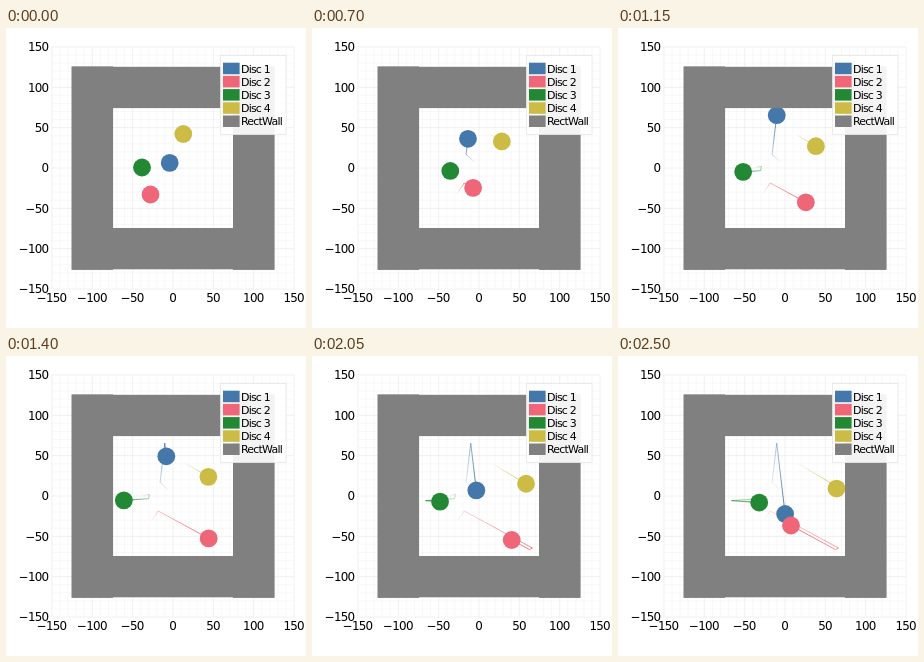
Recreate the animation shown at these times as an HTML page. Size 300 by 300 pixels, loop 2.55 s.

```html
<!DOCTYPE html>
<html lang="en">
<head>
<meta charset="utf-8">
<title>Bouncing discs</title>
<style>
html, body { margin: 0; width: 100%; height: 100%; overflow: hidden; background: #fff; }
svg { display: block; width: 100vw; height: 100vh; }
text { font-family: "DejaVu Sans", sans-serif; fill: #000; }
.tick { font-size: 11.9px; letter-spacing: -0.75px; }
.key { font-size: 11px; letter-spacing: -0.8px; }
</style>
</head>
<body>
<svg id="stage" viewBox="0 0 300 300"></svg>
<script>
const STEP = 50, STEPS = 51;
const CX = 167, CY = 140, UNIT = 0.807;
const RADIUS = 8.9, REACH = 52.6, WALL = '#808080';

// Start, velocity per step, and the new velocity at each collision
const discs = [
  { color: '#4477aa', at: [163.7, 134.9], v: [-1.2, -1.05], hits: { 8: [0.31, -2.62] } },
  { color: '#ee6677', at: [144.5, 166.5], v: [0.7, -1.045], hits: { 11: [2.97, 1.61] } },
  { color: '#228833', at: [136, 139.5], v: [0.93, -0.13], hits: { 8: [-0.26, 1.4], 11: [-1.46, 0.1] } },
  { color: '#ccbb44', at: [177.3, 106], v: [0.896, 0.531], hits: {} }
];

const stage = document.getElementById('stage');

function add(tag, attrs, text) {
  const el = document.createElementNS('http://www.w3.org/2000/svg', tag);
  for (const name in attrs) el.setAttribute(name, attrs[name]);
  if (text !== undefined) el.textContent = text;
  return stage.appendChild(el);
}

const rect = (x, y, width, height, fill, extra) => add('rect', { x, y, width, height, fill, ...extra });
const line = (x1, y1, x2, y2, stroke, width) =>
  add('line', { x1, y1, x2, y2, stroke, 'stroke-width': width });

// Reflect a velocity component once the disc has passed a wall
const bounce = (offset, v) => Math.abs(offset) > REACH ? -Math.sign(offset) * Math.abs(v) : v;

function simulate({ at, v, hits }) {
  let [x, y] = at, [vx, vy] = v;
  const points = [];
  for (let step = 0; step < STEPS; step++) {
    points.push([x, y]);
    if (hits[step]) [vx, vy] = hits[step];
    vx = bounce(x - CX, vx);
    vy = bounce(y - CY, vy);
    x += vx;
    y += vy;
  }
  return points;
}

function drawGrid() {
  const half = 150 * UNIT;
  for (const major of [false, true]) {
    for (let v = -150; v <= 150; v += 10) {
      if ((v % 50 === 0) !== major) continue;
      const d = v * UNIT, color = major ? '#ececec' : '#f7f7f7';
      line(CX + d, CY - half, CX + d, CY + half, color, 0.8);
      line(CX - half, CY - d, CX + half, CY - d, color, 0.8);
    }
  }
  for (let v = -150; v <= 150; v += 50) {
    const label = String(v).replace('-', '\u2212');
    add('text', { x: 42.4, y: CY - v * UNIT + 4.2, class: 'tick', 'text-anchor': 'end' }, label);
    add('text', { x: CX + v * UNIT - 0.4, y: 274, class: 'tick', 'text-anchor': 'middle' }, label);
  }
}

function drawWalls() {
  for (const x of [65.5, 227]) rect(x, 38.4, 41.6, 203.5, WALL);
  for (const y of [38.8, 200]) rect(66, y, 202, 41.3, WALL);
}

function drawLegend() {
  rect(214.5, 27.5, 65.5, 79, '#fff', { 'fill-opacity': 0.9, stroke: '#e6e6e6', 'stroke-width': 0.8 });
  const items = discs.map((d, i) => ['Disc ' + (i + 1), d.color]);
  items.push(['RectWall', WALL]);
  items.forEach(([label, color], i) => {
    const y = 40.4 + i * 13.2;
    rect(217, y - 5.7, 16.6, 11.5, color);
    add('text', { x: 235, y: y + 4.1, class: 'key' }, label);
  });
}

drawGrid();
for (const d of discs) {
  d.points = simulate(d);
  d.trail = d.points.slice(1).map((p, i) => line(...d.points[i], ...p, d.color, 1));
}
for (const d of discs) d.dot = add('circle', { r: RADIUS, fill: d.color });
drawWalls();
drawLegend();

let shown = -1;

function show(step) {
  if (step === shown) return;
  shown = step;
  for (const d of discs) {
    const [x, y] = d.points[step];
    d.dot.setAttribute('cx', x);
    d.dot.setAttribute('cy', y);
    // Older parts of the trail are fainter
    d.trail.forEach((seg, i) => seg.setAttribute('opacity', i < step ? (i + 0.5) / step : 0));
  }
}

const start = performance.now();

function tick() {
  const t = Math.max(0, performance.now() - start);
  show(Math.floor(t / STEP) % STEPS);
  requestAnimationFrame(tick);
}

tick();
</script>
</body>
</html>
```
